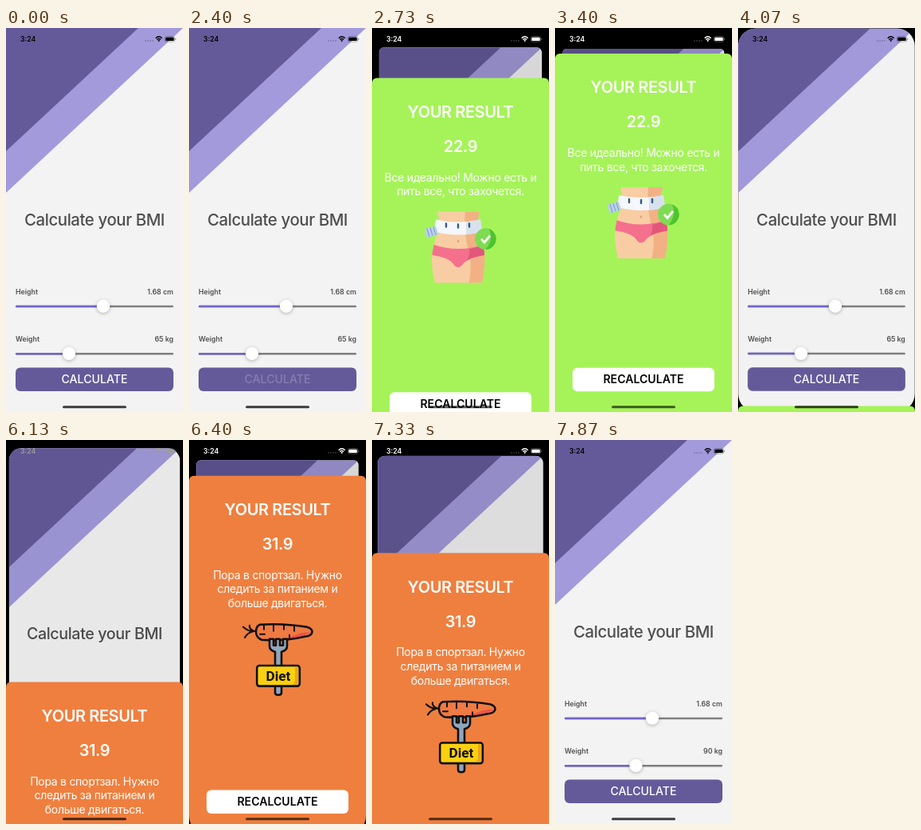
These frames come from a looping animation (222x480 px, 8000 ms). An HTML page:

```html
<!DOCTYPE html>
<html lang="en">
<head>
<meta charset="utf-8">
<title>BMI calculator</title>
<style>
  html, body { margin: 0; width: 100%; height: 100%; overflow: hidden; background: #000; }
  svg { display: block; width: 222px; height: 480px; font-family: Inter, Roboto, sans-serif; }
  .mid { text-anchor: middle; }
  .end { text-anchor: end; }
  .label { font-size: 8.8px; font-weight: 600; fill: #505050; }
  .title { font-size: 20.4px; font-weight: 500; letter-spacing: -.02em; }
  .head { font-size: 20px; font-weight: 600; letter-spacing: -.02em; }
  .note { font-size: 14px; letter-spacing: -.02em; }
  .btn { font-size: 14.1px; font-weight: 500; }
  .thumb { fill: #fff; filter: drop-shadow(0 1.5px 2px rgba(0, 0, 0, .28)); }
  .ink { stroke: #111; stroke-width: 2.6; stroke-linejoin: round; stroke-linecap: round; }
</style>
</head>
<body>
<svg viewBox="0 0 222 480">
  <defs>
    <clipPath id="pageClip"><rect id="pageBox" width="222" height="480"/></clipPath>
    <clipPath id="bodyClip">
      <path id="torso" d="M82 199H135Q131 213 133 225Q141 241 141.500 258Q141 275 138 288H79Q75 274 75 258Q76 240 83 225Q86 213 82 199Z"/>
    </clipPath>
    <clipPath id="checkClip"><circle cx="142.300" cy="233" r="13.300"/></clipPath>
  </defs>
  <rect width="222" height="480"/>

  <g id="page" clip-path="url(#pageClip)">
    <rect width="222" height="480" fill="#f3f3f3"/>
    <path d="M0 0H222L0 206Z" fill="#a29adb"/>
    <path d="M0 0H166L0 154Z" fill="#645a9a"/>
    <text class="title mid" x="111" y="247" fill="#4e4e4e">Calculate your BMI</text>

    <text class="label" x="12" y="332.700">Height</text>
    <text class="label end" x="210" y="332.700">1.68 cm</text>
    <rect x="12" y="346.800" width="198" height="2.400" rx="1.200" fill="#7f7f7f"/>
    <rect x="12" y="346.800" width="110" height="2.400" rx="1.200" fill="#7165cf"/>
    <circle class="thumb" cx="122" cy="347.800" r="8.200"/>

    <text class="label" x="12" y="391.700">Weight</text>
    <text class="label end" id="kg" x="210" y="391.700">65 kg</text>
    <rect x="12" y="406" width="198" height="2.400" rx="1.200" fill="#7f7f7f"/>
    <rect id="fill" x="12" y="406" width="67" height="2.400" rx="1.200" fill="#7165cf"/>
    <circle class="thumb" id="thumb" cx="79" cy="407" r="8.200"/>

    <rect x="12" y="424.500" width="198" height="29.500" rx="6" fill="#645a9a"/>
    <text class="btn mid" id="calc" x="111" y="444.300" fill="#fff">CALCULATE</text>
    <rect id="dim" width="222" height="480" opacity="0"/>
  </g>

  <g id="sheet">
    <path id="card"/>
    <g fill="#fff" class="mid">
      <text class="head" x="111" y="81.200">YOUR RESULT</text>
      <text class="head" id="bmi" x="111" y="124.200">22.9</text>
      <g class="note" id="note"></g>
    </g>

    <g id="fit">
      <use href="#torso" fill="#f9cda3"/>
      <g clip-path="url(#bodyClip)">
        <path d="M117 198H145V290H121Q126 270 122 250Q114 225 117 198Z" fill="#f2b184"/>
        <path d="M74 239Q108 252 143 239V253Q119 256 113 266Q108 271 103 266Q98 256 74 253Z" fill="#f4708d"/>
        <path d="M122 246Q133 244 143 239V253Q128 255 119 260Q123 254 122 246Z" fill="#e3567b"/>
      </g>
      <ellipse cx="108" cy="236" rx="1.200" ry="1.800" fill="#e59b72"/>
      <path d="M80 209Q108 215 136 209L138 224Q108 232 78 224Z" fill="#f4f7fb"/>
      <path d="M118 212Q128 211 136 209L138 224Q128 227 118 228Z" fill="#d8e2ee"/>
      <path d="M93 214V218M108 215V219M122 214V218" stroke="#345a7c" stroke-width="2.400" stroke-linecap="round"/>
      <path d="M67 220L80 217L83 227L70 232Q65 226 67 220Z" fill="#b8d2ee"/>
      <path d="M69 220L72 231M73 219L76 229M77 218L80 228" stroke="#7d95c0" stroke-width="1"/>
      <g clip-path="url(#checkClip)">
        <rect x="128" y="219" width="29" height="28" fill="#7edb52"/>
        <path d="M146 219Q154 233 142 247H158V219Z" fill="#4fc32f"/>
      </g>
      <path d="M137 233L141 237.500L148 229" fill="none" stroke="#fff" stroke-width="2.800"/>
    </g>

    <g id="diet" class="ink" fill="none">
      <path d="M84 226Q76 228 68 221M81 226Q75 223 76 219M79 227Q74 228 70 234" stroke-width="2.200"/>
      <path d="M89 218Q119 216 148 221Q154.500 223 154.500 227Q154 232 145 233Q119 239 91 237Q84 234 84 227Q84 220 89 218Z" fill="#ef7a43"/>
      <path d="M118 236Q140 234 153 228Q142 227 134 231Z" fill="#ee5147" stroke="none"/>
      <path d="M94 219V224M89 230H95M106 219V226M119 219V224M132 221V226M126 235V231" stroke-width="2"/>
      <path d="M101 236V245Q101 250 108 252V303Q108 306 112 306Q116 306 116 303V252Q123 250 123 245V236H118V244H114V236H109V244H106V236Z" fill="#91a6bb"/>
      <rect x="85.200" y="269.200" width="53.600" height="25.600" rx="3" fill="#fbd00f"/>
      <path d="M133 271H135Q137 271 137 273V291Q137 293 134 293H130Q133 291 133 286Z" fill="#eda51d" stroke="none"/>
      <text class="mid" x="112" y="288" font-family="Roboto, sans-serif" font-size="17.200" font-weight="700" fill="#111" stroke="none">Diet</text>
    </g>

    <rect x="22" y="424.700" width="178" height="29.500" rx="6" fill="#fff"/>
    <text class="btn mid" id="again" x="111" y="444.400" style="font-weight:600">RECALCULATE</text>
  </g>

  <g id="status">
    <text x="18" y="17.200" font-size="8.700" font-weight="600">3:24</text>
    <g opacity=".35">
      <circle cx="175" cy="16" r=".8"/><circle cx="178" cy="16" r=".8"/>
      <circle cx="181" cy="16" r=".8"/><circle cx="184" cy="16" r=".8"/>
    </g>
    <g fill="none" stroke="currentColor" stroke-width="1.400">
      <path d="M187.700 12.700Q191.700 9 195.700 12.700M189.300 14.600Q191.700 12.400 194.100 14.600"/>
    </g>
    <path d="M190.300 15.700Q191.700 14.500 193.100 15.700L191.700 17.200Z"/>
    <rect x="199.300" y="10.700" width="12.400" height="6.400" rx="2" fill="none" stroke="currentColor" stroke-width=".6" opacity=".5"/>
    <rect x="200.300" y="11.700" width="10.400" height="4.400" rx="1.200"/>
    <rect x="212.400" y="12.900" width=".8" height="2" rx=".4" opacity=".5"/>
  </g>
  <rect id="home" x="71" y="472.200" width="80" height="3" rx="1.500" opacity=".75"/>
</svg>

<script>
const LOOP = 8000;
const TOP = 32;
const SCREEN_R = 23;
const CARD_R = 6;
const OPEN = [2440, 6040];
const CLOSE = [3668, 7268];
// [pressed at, released at]
const CALC_TAPS = [[2400, 2440], [5870, 6050]];
const AGAIN_TAPS = [[3470, 3560], [7070, 7160]];
const RESULTS = [
  { bmi: '22.9', color: '#a5f359', art: 'fit',
    note: ['Все идеально! Можно есть и', 'пить все, что захочется.'] },
  { bmi: '31.9', color: '#ef7f3f', art: 'diet',
    note: ['Пора в спортзал. Нужно', 'следить за питанием и', 'больше двигаться.'] }
];

const $ = id => document.getElementById(id);
const set = (id, attrs) => {
  for (const k in attrs) $(id).setAttribute(k, attrs[k]);
};
const clamp = v => Math.min(1, Math.max(0, v));

// Critically damped spring from 0 to 1
function spring(ms) {
  const x = Math.max(0, ms) * 0.015;
  return 1 - (1 + x) * Math.exp(-x);
}

function tapAlpha(t, taps) {
  for (const [down, up] of taps) {
    if (t >= down && t < up + 350) return 0.22 + 0.78 * clamp((t - up) / 350);
  }
  return 1;
}

// Sheet outline; the lower corners follow the screen while it moves
function cardPath(low) {
  const r = CARD_R;
  return `M0 ${TOP + r}a${r} ${r} 0 0 1 ${r} ${-r}H${222 - r}a${r} ${r} 0 0 1 ${r} ${r}` +
    `V${480 - low}a${low} ${low} 0 0 1 ${-low} ${low}H${low}a${low} ${low} 0 0 1 ${-low} ${-low}Z`;
}

let shown = -1;
function showResult(i) {
  if (i === shown) return;
  shown = i;
  const r = RESULTS[i];
  $('bmi').textContent = r.bmi;
  $('note').innerHTML = r.note
    .map((line, n) => `<text x="111" y="${161 + n * 17.7}">${line}</text>`).join('');
  set('card', { fill: r.color });
  RESULTS.forEach(o => set(o.art, { display: o === r ? 'inline' : 'none' }));
}

function draw(t) {
  let p = 0;
  OPEN.forEach((start, i) => { p += spring(t - start) - spring(t - CLOSE[i]); });
  if (p < 0.002) p = 0;
  if (p > 0.998) p = 1;

  showResult(t < 5000 ? 0 : 1);
  set('page', { transform: `translate(${9.4 * p} ${26 * p}) scale(${1 - 0.085 * p})` });
  set('pageBox', { rx: p ? SCREEN_R + (CARD_R - SCREEN_R) * p : 0 });
  set('dim', { opacity: 0.12 * p });
  set('card', { d: cardPath(p < 1 ? SCREEN_R : 0) });
  set('sheet', {
    transform: `translate(0 ${(480 - TOP) * (1 - p)})`,
    display: p ? 'inline' : 'none'
  });

  const drag = clamp((t - 4340) / 910);
  const kg = Math.round(65 + 25 * drag * drag * (3 - 2 * drag));
  const x = 79 + (kg - 65) * 0.9;
  $('kg').textContent = kg + ' kg';
  set('fill', { width: x - 12 });
  set('thumb', { cx: x });

  set('calc', { opacity: tapAlpha(t, CALC_TAPS) });
  set('again', { opacity: tapAlpha(t, AGAIN_TAPS) });

  const v = Math.round(255 * clamp((p - 0.15) / 0.4));
  const tone = `rgb(${v},${v},${v})`;
  set('status', { fill: tone, color: tone });
  set('home', { opacity: 0.75 - 0.12 * p });
}

function tick() {
  draw(performance.now() % LOOP);
  requestAnimationFrame(tick);
}
tick();
</script>
</body>
</html>
```
